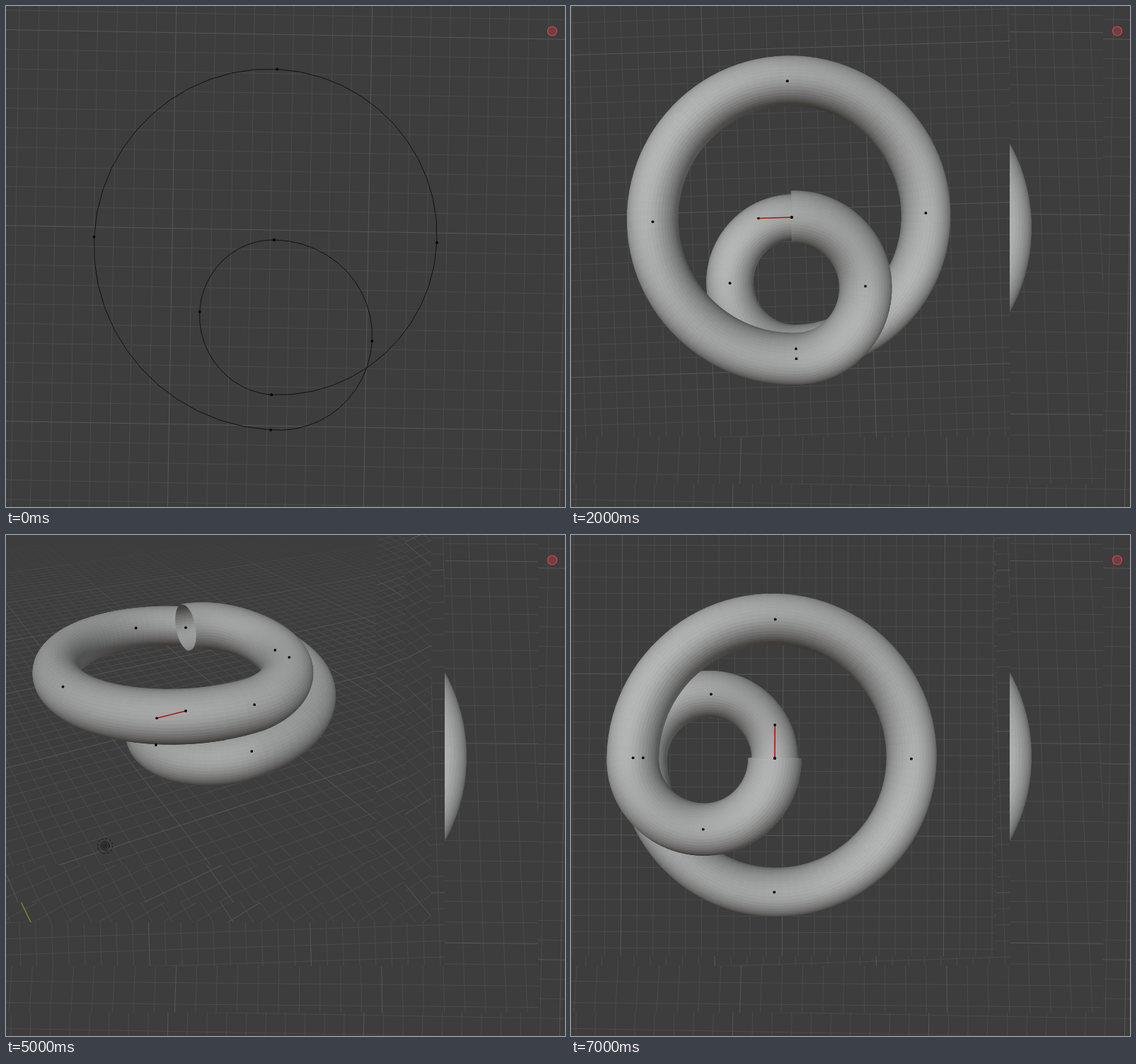
An HTML page with a canvas for the animation above (8 s loop, 790 by 709 pixels).

```html
<!DOCTYPE html>
<html lang="en">
<head>
<meta charset="utf-8">
<title>Coiled tube</title>
<style>
  html, body { margin: 0; width: 100%; height: 100%; overflow: hidden; background: #3d3d3d; }
  canvas { display: block; }
</style>
</head>
<body>
<canvas id="stage" width="790" height="709"></canvas>
<script>
const W = 790, H = 709, STEP = 1000, EYE = 4.5, KAPPA = 0.552;

// Curve knots (x, y); height grows by `rise` from knot to knot.
const OUT = .84, IN = .415;
const KNOTS = [[0, 0], [-IN, -IN], [0, -OUT], [OUT, 0], [0, OUT], [-OUT, 0], [0, -OUT], [IN, -IN], [0, 0]];

// box: repainted area; at: screen place of the first knot; yaw and tilt in degrees.
const SCENES = [
  { box: [0, 0, 790, 709], at: [379, 331], size: 239, yaw: -1, tilt: 0, rise: .19, floor: .617, wire: true, knots: true },
  { box: [0, 0, 752, 676], at: [397, 305], size: 254, yaw: -.5, tilt: 11, rise: 0, floor: 0,
    unit: 1.086, grid: [-.575, .05], radius: .154, axis: true, extra: drawGap },
  { box: [0, 0, 620, 610], at: [312, 299], size: 214, yaw: 1.85, tilt: 0, floor: .277, knots: true, handle: true },
  { box: [0, 0, 601, 548], at: [304, 309], size: 216, yaw: 32, tilt: 33, floor: -.12, knots: true, handle: true, axis: true },
  { box: [0, 0, 564, 520], at: [283, 272], size: 211, yaw: 30, tilt: 48.7, floor: -.12, knots: true, handle: true },
  { box: [0, 0, 523, 467], at: [254, 249], size: 205, yaw: 27, tilt: 60.6, floor: -.12, knots: true, handle: true,
    extra: c => drawLamp(c, 140, 440) },
  { box: [1, 28, 545, 267], at: [254, 217], size: 200, yaw: 19, tilt: 81.5, floor: -.12, knots: true, handle: true,
    extra: drawRig },
  { box: [0, 0, 598, 596], at: [288, 316], size: 214, yaw: -90.2, tilt: 0, floor: .277, knots: true, handle: true }
];

const add = (a, b, k = 1) => a.map((v, i) => v + b[i] * k);
const dot = (a, b) => a[0] * b[0] + a[1] * b[1] + a[2] * b[2];
const unit = a => a.map(v => v / Math.hypot(...a));
const clamp = (v, lo, hi) => Math.min(hi, Math.max(lo, v));
const LIGHT = unit([-.24, .3, .92]);

function makeCamera({ at, size, yaw, tilt }) {
  const rad = Math.PI / 180;
  const cy = Math.cos(yaw * rad), sy = Math.sin(yaw * rad);
  const ct = Math.cos(tilt * rad), st = Math.sin(tilt * rad);
  // View space: right, up, towards the viewer.
  const turn = ([x, y, z]) => {
    const away = x * sy + y * cy;
    return [x * cy - y * sy, away * ct + z * st, z * ct - away * st];
  };
  const w = v => 1 - v[2] / EYE;
  const flat = v => [at[0] + size * v[0] / w(v), at[1] - size * v[1] / w(v)];
  return { turn, w, flat, ct, project: p => flat(turn(p)) };
}

const easeIn = t => t * t * (2 - t);

function curveAt(u, rise) {
  const i = Math.min(7, Math.floor(u)), t = u - i, s = 1 - t;
  const a = KNOTS[i], b = KNOTS[i + 1], lead = i % 2;
  const axis = k => {
    const d = (b[k] - a[k]) * KAPPA;
    const c1 = k === lead ? a[k] + d : a[k];
    const c2 = k === lead ? b[k] : b[k] - d;
    return s * s * s * a[k] + 3 * s * s * t * c1 + 3 * s * t * t * c2 + t * t * t * b[k];
  };
  // Both ends of the curve leave level.
  const climb = i === 0 ? easeIn(t) : i === 7 ? 1 - easeIn(s) : t;
  return [axis(0), axis(1), (i + climb) * rise];
}

function line(c, points, color, width = 1) {
  c.strokeStyle = color;
  c.lineWidth = width;
  c.beginPath();
  points.forEach(p => c.lineTo(...p));
  c.stroke();
}

function shape(c, points, color) {
  c.fillStyle = color;
  c.beginPath();
  points.forEach(p => c.lineTo(...p));
  c.closePath();
  c.fill();
}

function drawGrid(c, cam, scene) {
  const REACH = 8, NEAR = .15, size = scene.unit || 1;
  const origin = scene.grid || [-.52, .05];
  const strength = Math.min(1, cam.ct * 2.5);
  const place = (dir, n, m) => {
    const q = dir ? [m, n] : [n, m];
    return cam.turn([origin[0] + q[0] * size, origin[1] + q[1] * size, scene.floor]);
  };
  for (const major of [false, true]) {
    for (let n = -REACH * 10; n <= REACH * 10; n++) {
      if ((n % 10 === 0) !== major) continue;
      for (const dir of [0, 1]) {
        const green = scene.axis && !dir && n === -10;
        for (let m = -REACH; m < REACH; m++) {
          let a = place(dir, n / 10, m), b = place(dir, n / 10, m + 1);
          let wa = cam.w(a), wb = cam.w(b);
          if (wa < NEAR && wb < NEAR) continue;
          if (wa < NEAR) a = add(a, add(b, a, -1), (NEAR - wa) / (wb - wa));
          if (wb < NEAR) b = add(b, add(a, b, -1), (NEAR - wb) / (wa - wb));
          const alpha = strength * clamp(1 + (1.3 - (cam.w(a) + cam.w(b)) / 2) * 1.4, 0, 1);
          if (alpha <= 0) continue;
          c.globalAlpha = alpha;
          line(c, [cam.flat(a), cam.flat(b)], green ? "#6f9226" : major ? "#575757" : "#4b4b4b", green ? 1.4 : 1);
        }
      }
    }
  }
  c.globalAlpha = 1;
}

function shade(n, t) {
  const under = Math.max(0, -n[1]);
  const v = 80 + 86 * Math.max(0, dot(n, LIGHT)) + 10 * Math.max(0, n[2]) ** 8 - 12 * under * under
    + 6 * (t[1] * t[1] - t[0] * t[0]) + 14 * t[0] * t[1];
  const warm = 6 * under * under;
  return `rgb(${v + warm * .3 | 0},${v + 1 - warm * .4 | 0},${v + 1 - warm | 0})`;
}

function drawTube(c, cam, scene, rise) {
  const RINGS = 208, SIDES = 48, radius = scene.radius || .15;
  const rings = [];
  for (let i = 0; i <= RINGS; i++) {
    const u = i / RINGS * 8;
    const p = curveAt(u, rise);
    const t = unit(add(curveAt(Math.min(8, u + .01), rise), curveAt(Math.max(0, u - .01), rise), -1));
    const side = unit([-t[1], t[0], 0]);
    const up = [-t[2] * side[1], t[2] * side[0], t[0] * side[1] - t[1] * side[0]];
    const ring = [];
    for (let j = 0; j <= SIDES; j++) {
      const a = j / SIDES * 2 * Math.PI;
      const n = add(side.map(v => v * Math.cos(a)), up, Math.sin(a));
      const view = cam.turn(add(p, n, radius));
      ring.push({ view, n: cam.turn(n), xy: cam.flat(view) });
    }
    rings.push({ ring, t: cam.turn(t) });
  }
  const quads = [];
  for (let i = 0; i < RINGS; i++) {
    const nearEnd = i < 30 || i > RINGS - 30;
    for (let j = 0; j < SIDES; j++) {
      const corners = [rings[i].ring[j], rings[i + 1].ring[j], rings[i + 1].ring[j + 1], rings[i].ring[j + 1]];
      let n = unit(add(corners[0].n, corners[2].n));
      const v = corners[0].view;
      if (dot(n, [-v[0], -v[1], EYE - v[2]]) < 0) {
        if (!nearEnd) continue;
        n = n.map(k => -k);
      }
      quads.push({
        depth: corners.reduce((s, k) => s + k.view[2], 0),
        points: corners.map(k => k.xy),
        color: shade(n, rings[i].t)
      });
    }
  }
  quads.sort((a, b) => a.depth - b.depth);
  for (const q of quads) {
    shape(c, q.points, q.color);
    c.strokeStyle = q.color;
    c.lineWidth = .8;
    c.stroke();
  }
}

function disc(c, x, y, r, fill) {
  c.fillStyle = fill;
  c.beginPath();
  c.arc(x, y, r, 0, 2 * Math.PI);
  c.fill();
}

function drawGap(c) {
  shape(c, [[394, 267], [400, 267], [398, 343], [396.4, 343]], "#333");
  line(c, [[394.5, 268], [396.8, 343]], "#999", .7);
}

function drawLamp(c, x, y) {
  disc(c, x, y, 1.3, "#111");
  [[3.2, []], [6, []], [10.5, [3, 2.5]]].forEach(([r, dash]) => {
    c.setLineDash(dash);
    c.strokeStyle = "#151515";
    c.lineWidth = 1;
    c.beginPath();
    c.arc(x, y, r, 0, 2 * Math.PI);
    c.stroke();
  });
  c.setLineDash([]);
}

function drawRig(c) {
  const tip = [314, 205], frame = [[231, 226], [255, 218], [267, 245], [244, 254]];
  line(c, [...frame, frame[0]], "#111");
  frame.forEach(p => line(c, [tip, p], "#111"));
  shape(c, [[234, 202], [233, 217], [250, 217]], "#000");
  line(c, [[58, 134], [65, 295]], "#2a2a2a");
  drawLamp(c, 57, 129);
}

function drawScene(c, scene) {
  const { box, rise = .077 } = scene;
  const cam = makeCamera(scene);
  c.save();
  c.beginPath();
  c.rect(...box);
  c.clip();
  c.fillStyle = "#3d3d3d";
  c.fillRect(...box);
  drawGrid(c, cam, scene);
  if (scene.wire) {
    const points = Array.from({ length: 97 }, (_, i) => cam.project(curveAt(i / 12, rise)));
    line(c, points, "#111");
    disc(c, 772, 35.5, 6.5, "#6e3f44");
    c.lineWidth = 1.2;
    c.strokeStyle = "#d8484f";
    c.stroke();
  } else {
    drawTube(c, cam, scene, rise);
  }
  if (scene.handle) {
    const end = cam.project([-.22, 0, 0]);
    line(c, [cam.project([0, 0, 0]), end], "#a8170f", 1.6);
    disc(c, ...end, 1.8, "#000");
  }
  if (scene.knots) KNOTS.forEach((_, i) => disc(c, ...cam.project(curveAt(i, rise)), 1.9, "#000"));
  if (scene.extra) scene.extra(c);
  c.restore();
}

// Every picture keeps what lies outside its own box from the picture before.
const pictures = [];
for (const scene of SCENES) {
  const canvas = document.createElement("canvas");
  canvas.width = W;
  canvas.height = H;
  const c = canvas.getContext("2d");
  if (pictures.length) c.drawImage(pictures[pictures.length - 1], 0, 0);
  drawScene(c, scene);
  pictures.push(canvas);
}

const stage = document.getElementById("stage").getContext("2d");
function show(time) {
  stage.drawImage(pictures[Math.floor(time / STEP) % pictures.length], 0, 0);
  requestAnimationFrame(show);
}
show(0);
</script>
</body>
</html>
```
